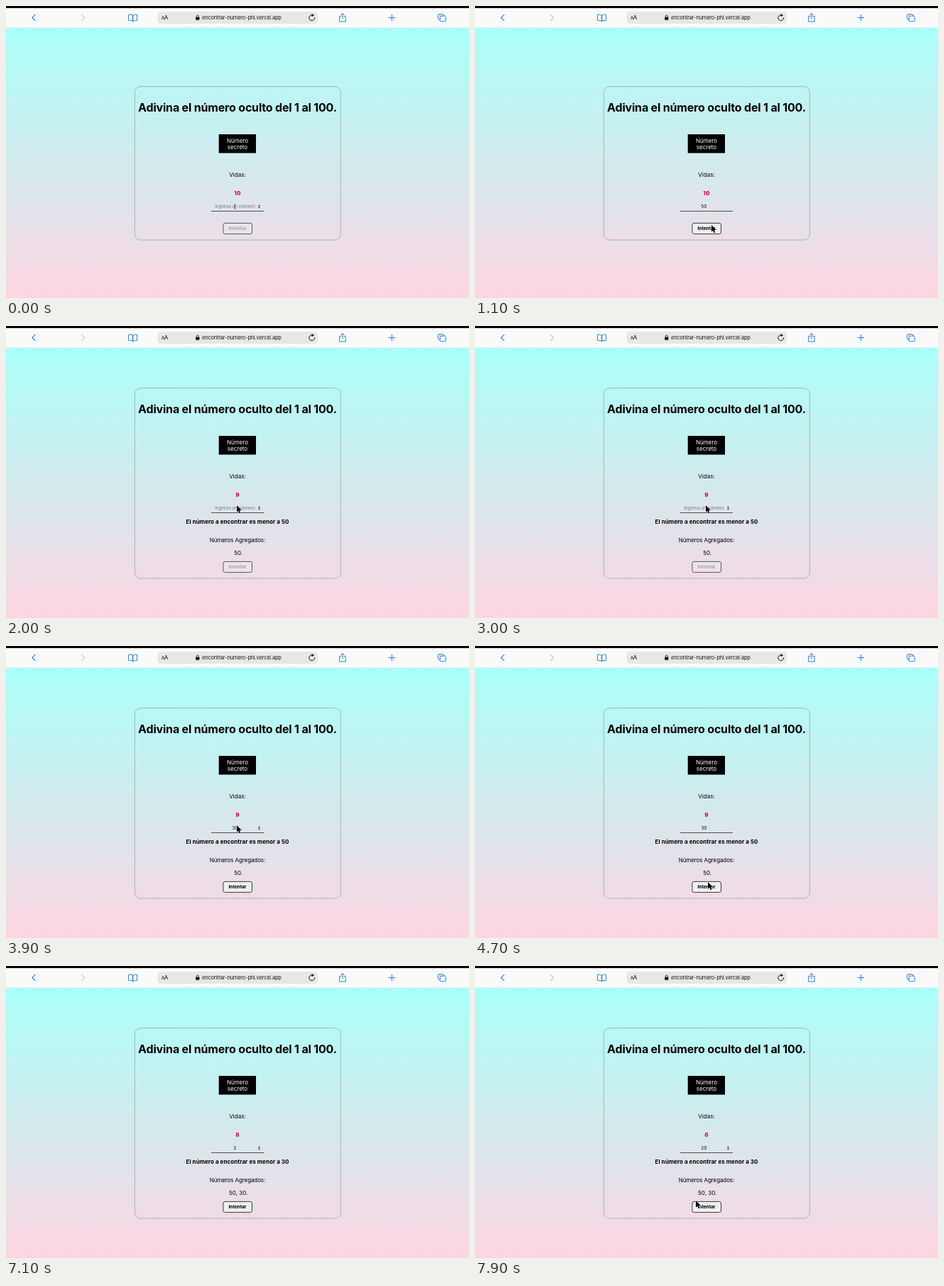
These frames come from a looping animation (652x412 px, 8000 ms). An HTML page with a canvas:

```html
<!DOCTYPE html>
<html lang="es">
<head>
<meta charset="utf-8">
<title>Adivina el número</title>
<style>
  html, body { margin: 0; width: 100%; height: 100%; overflow: hidden; background: #fff; }
  canvas { display: block; width: 652px; height: 412px; }
</style>
</head>
<body>
<canvas id="stage"></canvas>
<script>
const W = 652, H = 412, LOOP = 8000, STEP = 100;
const KEY_GAP = 200, BLINK = 600, RETURN = 700, HOVER_LAG = 300;
const BLUE = '#2f7fe0', MID = 326, FIELD_Y = 283, SHIFT = 26;
const canvas = document.getElementById('stage');
const ctx = canvas.getContext('2d');
const scale = window.devicePixelRatio || 1;
canvas.width = W * scale;
canvas.height = H * scale;

const point = (x, y) => ({ x, y });

// Each guess: typing starts, pointer shows, reaches the button, guess is sent, pointer is back.
const rounds = [
  { guess: '50', type: 200, show: 500, reach: 1000, send: 1300, back: 2000,
    field: point(322, 281), bend: point(327, 295), button: point(333, 309) },
  { guess: '30', type: 3300, show: 3900, reach: 4700, send: 5000, back: 6000,
    field: point(325, 253), bend: point(388, 293), button: point(328, 333) },
  { guess: '20', type: 7000, show: 7500, reach: 7900, send: Infinity, back: Infinity,
    field: point(317, 255), bend: point(240, 293), button: point(311, 331) }
];

const roundAt = t => rounds.findLastIndex(r => r.type <= t);
const sentAt = t => rounds.filter(r => r.send <= t).map(r => r.guess);

function valueAt(t) {
  const r = rounds[roundAt(t)];
  if (!r || t >= r.send) return '';
  return r.guess.slice(0, 1 + Math.floor((t - r.type) / KEY_GAP));
}

function ease(t, from, to) {
  const k = Math.min(1, Math.max(0, (t - from) / (to - from)));
  return k * k * (3 - 2 * k);
}

function curve(a, b, c, k) {
  const mix = d => (1 - k) ** 2 * a[d] + 2 * k * (1 - k) * b[d] + k * k * c[d];
  return point(mix('x'), mix('y'));
}

// The pointer is hidden while typing.
function pointerAt(t) {
  const i = roundAt(t), r = rounds[i];
  if (!r || t < r.show) return null;
  if (t < r.send) return curve(r.field, r.bend, r.button, ease(t, r.show, r.reach));
  return curve(r.button, r.button, rounds[i + 1].field, ease(t, r.back - RETURN, r.back));
}

function overField(t) {
  const p = pointerAt(t);
  const y = FIELD_Y - (sentAt(t).length ? SHIFT : 0);
  return !p || (Math.abs(p.x - MID) < 37 && Math.abs(p.y - y) < 11);
}

function text(str, x, y, size, { weight = 400, color = '#000', gap = 0, align = 'center' } = {}) {
  ctx.font = `${weight} ${size}px Inter, sans-serif`;
  ctx.letterSpacing = gap + 'px';
  ctx.textAlign = align;
  ctx.fillStyle = color;
  ctx.fillText(str, x, y + size * 0.36);
}

function rect(color, x, y, w, h) {
  ctx.fillStyle = color;
  ctx.fillRect(x, y, w, h);
}

function box(x, y, w, h, r, fill, stroke, width = 1) {
  ctx.beginPath();
  ctx.roundRect(x, y, w, h, r);
  if (fill) { ctx.fillStyle = fill; ctx.fill(); }
  if (stroke) { ctx.strokeStyle = stroke; ctx.lineWidth = width; ctx.stroke(); }
}

function stroke(color, path, width = 1.1) {
  ctx.strokeStyle = color;
  ctx.lineWidth = width;
  ctx.stroke(new Path2D(path));
}

function fill(color, path) {
  ctx.fillStyle = color;
  ctx.fill(new Path2D(path));
}

function background() {
  const g = ctx.createLinearGradient(0, 30, 0, H);
  g.addColorStop(0, '#a9fff9');
  g.addColorStop(1, '#fdd5e2');
  ctx.fillStyle = g;
  ctx.fillRect(0, 0, W, H);
}

function toolbar() {
  rect('#fafafa', 0, 0, W, 30);
  rect('#000', 0, 0, W, 3);
  rect('#dfeeee', 0, 30, W, 1);
  ctx.lineCap = ctx.lineJoin = 'round';

  stroke(BLUE, 'M41 12.3l-4.2 4.2 4.2 4.2');
  stroke('#c6c6c8', 'M106.4 12.3l4.2 4.2-4.2 4.2');
  for (const s of [-1, 1]) {
    stroke(BLUE, `M178.5 13.2q${s * 2.5}-1.9 ${s * 6}-1v8.2q${-s * 3.5}-.8 ${-s * 6} 1.1z`, 1);
  }

  // Address field
  box(213.5, 8, 225.5, 17, 4.5, '#e7e7e8');
  text('A', 219, 17.1, 6, { align: 'left' });
  text('A', 222.8, 16.6, 8, { align: 'left' });
  box(267.2, 15.6, 5.2, 4.2, 0.8, '#111');
  stroke('#111', 'M268.3 15.6v-1.2a1.5 1.5 0 0 1 3 0v1.2', 0.8);
  text('encontrar-numero-phi.vercel.app', 276, 16.4, 7.4, { align: 'left', gap: -0.15, color: '#1a1a1a' });
  stroke('#111', 'M434.6 16.6a3.9 3.9 0 1 1-2.2-3.4', 1);
  fill('#111', 'M430.6 10.8l3.5 2.5-3.5 1.7z');

  // Share, new tab, tab overview
  stroke(BLUE, 'M472 14.4h-2.4v7.6h8.6v-7.6h-2.4M473.9 18v-7.4m-2.1 1.9l2.1-2.1 2.1 2.1', 1);
  stroke(BLUE, 'M539.2 16.5h8.6m-4.3-4.3v8.6');
  box(608.6, 11.6, 8, 7.8, 1.5, null, BLUE);
  box(611.2, 14, 8, 7.8, 1.5, '#fafafa', BLUE);
}

function field(value, y, t) {
  if (value) text(value, 322.3, y, 6.67, { color: '#111' });
  else text('Ingresa un número', 322.5, y, 6.67, { color: '#777f86', gap: -0.13 });

  const hover = overField(t);
  if (!value && hover && t % (2 * BLINK) < BLINK) rect('#1c2b3a', 321.9, y - 4, 0.8, 8);
  if (hover || overField(t - HOVER_LAG)) {
    for (const s of [-1, 1]) fill('#222', `M354.8 ${y + s * 0.7}h3.4l-1.7 ${s * 1.9}z`);
  }
  rect('#4b5052', 289, y + 6, 74, 1);
}

function button(y, enabled) {
  box(305.9, y - 7.6, 40.6, 15.2, 2.6, enabled ? '#efefef' : 'rgba(239,239,239,.25)',
    enabled ? '#3b3b3b' : '#55595b');
  text('Intentar', MID, y, 6.67, { weight: 700, color: enabled ? '#000' : '#a3a7aa', gap: -0.08 });
}

function game(t) {
  const tries = sentAt(t);
  const shift = tries.length ? SHIFT : 0;
  const value = valueAt(t);

  box(181.3, 113.7 - shift, 290, 216.4 + 2 * shift, 8, null, '#a9b3b5');
  ctx.save();
  ctx.translate(0, -shift);
  text('Adivina el número oculto del 1 al 100.', MID, 143.6, 16, { weight: 700, gap: -0.18 });
  rect('#000', 299.7, 181, 52.3, 26.5);
  text('Número', MID, 189.9, 8, { color: '#fff' });
  text('secreto', MID, 199.1, 8, { color: '#fff' });
  text('Vidas:', MID, 238.3, 8);
  text(10 - tries.length, MID, 264, 8, { weight: 800, color: '#dc0a46', gap: 0.2 });
  field(value, FIELD_Y, t);
  ctx.restore();

  if (tries.length) {
    text(`El número a encontrar es menor a ${tries.at(-1)}`, MID, 276.2, 8, { weight: 700, gap: 0.06 });
    text('Números Agregados:', MID, 302.2, 8, { gap: -0.1 });
    text(tries.join(', ') + '.', 327.2, 320.2, 8);
  }
  button(314 + shift, value !== '');
}

function pointer(t) {
  const p = pointerAt(t);
  if (!p) return;
  const arrow = 'M0 0v9.8l2.2-2 1.5 3.4 1.7-.7-1.5-3.4h3z';
  ctx.save();
  ctx.translate(p.x, p.y);
  stroke('rgba(255,255,255,.85)', arrow, 1);
  fill('#000', arrow);
  ctx.restore();
}

function draw(now) {
  const t = Math.floor((now % LOOP) / STEP) * STEP;
  ctx.setTransform(scale, 0, 0, scale, 0, 0);
  background();
  toolbar();
  game(t);
  pointer(t);
}

const start = performance.now();
function tick() {
  draw(performance.now() - start);
  requestAnimationFrame(tick);
}
tick();
</script>
</body>
</html>
```
